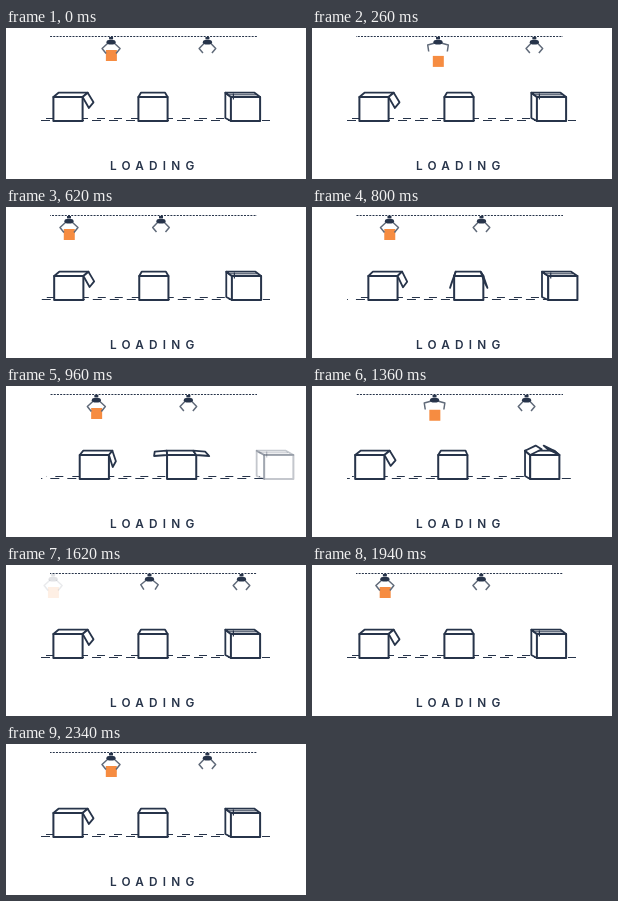
Animation, 300 px wide and 151 px high, one loop 2360 ms. Source, as an HTML page with a canvas:

```html
<!DOCTYPE html>
<html lang="en">
<head>
<meta charset="utf-8">
<title>Loading</title>
<style>
  html, body { margin: 0; width: 100%; height: 100%; overflow: hidden; background: #fff; }
  svg, canvas { display: block; position: absolute; left: 0; top: 0; }
  text { font: 600 11.8px Inter, "Open Sans", sans-serif; letter-spacing: 5.2px; fill: #27344a; }
</style>
</head>
<body>
<canvas id="stage" width="300" height="151"></canvas>
<svg width="300" height="151"><text x="104" y="142">LOADING</text></svg>
<script>
const ctx = document.getElementById('stage').getContext('2d');
const INK = '#27344a', ARM = '#606a79', ORANGE = '#f68c41';
const LOOP = 2360, CYCLE = 2340, SPEED = 0.0805, RELEASE = 118.4;
const TOP = 69, BACK = 64.7, BOTTOM = 93, HALF = 14.6;

const clamp = v => Math.max(0, Math.min(1, v));

// Piecewise linear interpolation through [input, output] stops.
function ramp(v, stops) {
  let i = 1;
  while (i < stops.length - 1 && v > stops[i][0]) i++;
  const [a, b] = [stops[i - 1], stops[i]];
  return a[1] + (b[1] - a[1]) * clamp((v - a[0]) / (b[0] - a[0]));
}

function path(points, { fill, stroke = INK, width = 2, closed = false } = {}) {
  ctx.beginPath();
  points.forEach(([x, y]) => ctx.lineTo(x, y));
  if (closed) ctx.closePath();
  if (fill) { ctx.fillStyle = fill; ctx.fill(); }
  ctx.strokeStyle = stroke;
  ctx.lineWidth = width;
  ctx.stroke();
}

const panel = (points, width = 1.8) => path(points, { fill: '#fff', closed: true, width });

function dashes(y, x0, x1, pattern, shift, width) {
  ctx.save();
  ctx.setLineDash(pattern);
  ctx.lineDashOffset = -shift;
  path([[x0, y], [x1, y]], { width });
  ctx.restore();
}

function conveyor(t) {
  const u = clamp((t - 525) / 980);
  const a = u ** 2.08, b = (1 - u) ** 1.5;
  return a / (a + b);
}

// side: -1 left, 1 right; angle in degrees below the outward horizontal.
function flap(side, front, back, angle) {
  if (angle > 88) return;
  const r = angle * Math.PI / 180;
  const dx = side * 13 * Math.cos(r), dy = 12.5 * Math.sin(r);
  panel([[front, TOP], [back, BACK], [back + dx * 0.92, BACK + dy * 0.88], [front + dx, TOP + dy]]);
}

// place: 0 left stop, 1 middle stop, 2 right stop.
function box(place, alpha) {
  if (alpha <= 0) return;
  const x = ramp(place, [[-1, 4], [0, 62], [1, 147], [2, 239.5], [3, 347]]);
  const l = x - HALF, r = x + HALF;
  const depth = (147 - x) * 0.06, inset = 2.5 * clamp(1 - Math.abs(x - 147) / 60);
  const bl = l + depth + inset, br = r + depth - inset;
  ctx.globalAlpha = alpha;
  if (place > 1.5) panel([[bl, BACK], [l, TOP], [l, BOTTOM], [bl, BOTTOM - 3]]);
  panel([[l, TOP], [bl, BACK], [br, BACK], [r, TOP]]);
  panel([[l, TOP], [r, TOP], [r, BOTTOM], [l, BOTTOM]], 2);
  if (place >= 1.995) {
    path([[bl + 2, 66.8], [br + 2, 66.8]], { width: 1 });
    path([[l + 2.5, 65.5], [l + 2.5, 71.5]], { width: 1.2 });
  } else if (place > 1) {
    const angle = ramp(place, [[1.05, 90], [1.3, 7], [1.93, -153], [2, -180]]);
    flap(-1, l, bl, angle);
    flap(1, r, br, angle);
  } else {
    flap(1, r, br, ramp(place, [[0, 61], [0.31, 73], [0.7, 90]]));
  }
  ctx.globalAlpha = 1;
}

function claw(x) {
  if (x < 46 || x > 250) return;
  ctx.globalAlpha = clamp((x - 46) / 8) * clamp((250 - x) / 8);
  if (x < 145) {
    const fall = 0.00066 * Math.max(0, (x - RELEASE) / SPEED) ** 2;
    ctx.save();
    ctx.beginPath();
    ctx.rect(0, 0, 300, TOP - 1);
    ctx.clip();
    ctx.fillStyle = ORANGE;
    ctx.fillRect(x - 5.2, 22 + fall, 11, 11);
    ctx.restore();
  }
  const pose = (hold, open, shut) =>
    ramp(x, [[113, hold], [121, open], [128, open], [148, shut]]);
  const elbow = [pose(9, 10.3, 8.3), pose(20.5, 17, 20.5)];
  const tip = [pose(5, 9.3, 4.5), pose(25.5, 23.5, 25)];
  for (const side of [-1, 1]) {
    path([[x + side * 3, 15], [x + side * elbow[0], elbow[1]], [x + side * tip[0], tip[1]]],
      { stroke: ARM, width: 1.5 });
  }
  ctx.fillStyle = INK;
  ctx.fillRect(x - 2, 9, 4, 2.4);
  ctx.beginPath();
  ctx.ellipse(x, 14.2, 4.6, 2.4, 0, 0, 7);
  ctx.fill();
  ctx.globalAlpha = 1;
}

function draw(now) {
  const t = Math.min(now % LOOP, CYCLE);
  const moved = conveyor(t);
  ctx.clearRect(0, 0, 300, 151);
  ctx.lineJoin = 'round';

  dashes(8.5, 44, 251, [2, 1.2], t * SPEED, 1);
  dashes(90.5, 40, 254, [8, 9], moved * 85, 1);
  dashes(92.5, 35, 264, [9, 8], moved * 85, 1);

  box(moved - 1, clamp((t - 1030) / 150));
  box(moved, 1);
  box(moved + 1, 1);
  box(moved + 2, 1 - clamp((t - 885) / 105));

  for (const start of [-1197, 0, 1143, CYCLE]) claw(105 + SPEED * (t - start));
}

function tick() {
  draw(performance.now());
  requestAnimationFrame(tick);
}
tick();
</script>
</body>
</html>
```
